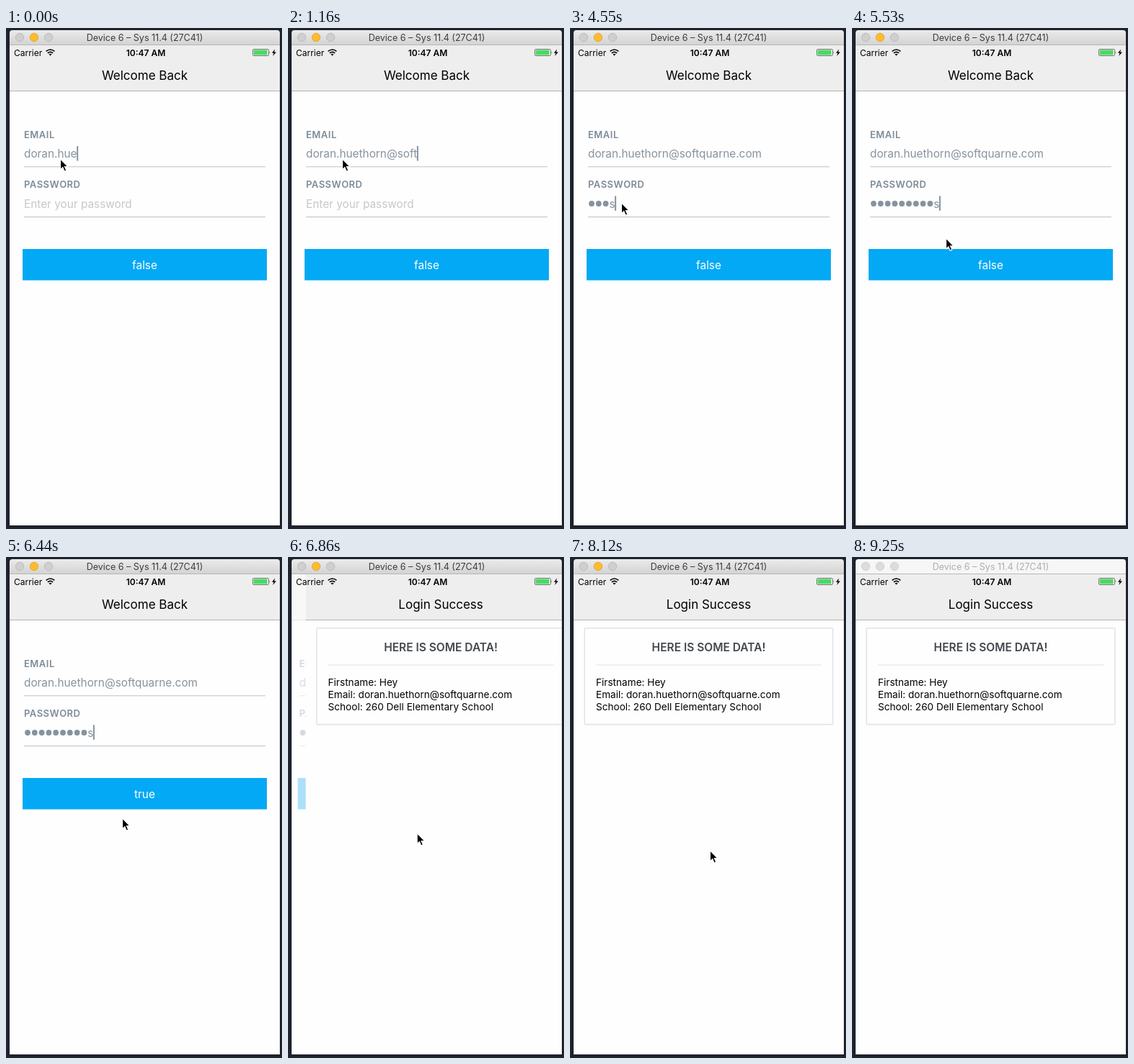
An HTML page for the animation above (9.35 s loop, 383 by 696 pixels).

```html
<!DOCTYPE html>
<html lang="en">
<head>
<meta charset="utf-8">
<title>Login flow</title>
<style>
html, body { margin: 0; width: 100%; height: 100%; overflow: hidden; background: #1f232d; }
svg { display: block; }
text { font: 15.35px Inter, sans-serif; }
.mid { text-anchor: middle; }
.bar { font-size: 12.5px; }
.status { font-size: 12px; }
.nav { font-size: 17px; }
.label { font-size: 13px; font-weight: 600; letter-spacing: .5px; fill: #7d8b97; }
.field { fill: #86939e; }
.head { font-size: 15.5px; font-weight: 600; fill: #43484d; }
.data { font-size: 13.6px; }
</style>
</head>
<body>
<svg width="383" height="696" viewBox="0 0 383 696">
  <defs>
    <linearGradient id="metal" x2="0" y2="1">
      <stop stop-color="#ebebeb"/><stop offset="1" stop-color="#d2d2d2"/>
    </linearGradient>
  </defs>
  <rect width="383" height="696" fill="#1f232d"/>

  <path id="titlebar" d="M5 24V7q0-4 4-4h367q4 0 4 4v17z"/>
  <path d="M5 23.5h375" stroke="#b8b8b8"/>
  <g id="lights" stroke-width=".8">
    <circle cx="19" cy="13" r="5.7"/><circle cx="39" cy="13" r="5.7"/><circle cx="59" cy="13" r="5.7"/>
  </g>
  <text id="device" class="bar mid" x="192.5" y="17.5">Device 6 – Sys 11.4 (27C41)</text>

  <svg x="5" y="24" width="375" height="667" viewBox="5 24 375 667">
    <rect x="5" y="24" width="375" height="667" fill="#fefefe"/>
    <g id="login">
      <rect x="5" y="24" width="375" height="63" fill="#eeeeef"/>
      <path d="M5 87.5h375" stroke="#b4b4b5"/>
      <text class="nav mid" x="192.5" y="71.5">Welcome Back</text>
      <text class="label" x="25" y="152.5">EMAIL</text>
      <text id="mail" class="field" x="25" y="180"></text>
      <text class="label" x="25" y="222">PASSWORD</text>
      <text id="hint" x="25" y="249.5" fill="#c7c7cd">Enter your password</text>
      <path id="dots" stroke="#86939e" stroke-width="7.8" stroke-linecap="round" stroke-dasharray="0 9.8"/>
      <text id="letter" class="field" y="249.5"></text>
      <path d="M25 192.8h335M25 262.5h335" stroke="#b9c2ca"/>
      <rect id="caret" width="2" height="20.5" fill="#86939e"/>
      <rect x="23" y="307" width="339" height="43.5" fill="#03a9f4"/>
      <text id="button" class="mid" x="192.5" y="334.5" fill="#fff"></text>
    </g>
    <g id="success">
      <rect x="5" y="24" width="375" height="667" fill="#fefefe"/>
      <rect x="5" y="24" width="375" height="63" fill="#eeeeef"/>
      <path d="M5 87.5h375" stroke="#b4b4b5"/>
      <text class="nav mid" x="192.5" y="71.5">Login Success</text>
      <rect x="20.2" y="98.8" width="344.6" height="133.8" rx="1" fill="none" stroke="#e2e4eb" stroke-width="1.6"/>
      <text class="head mid" x="192.5" y="130.5">HERE IS SOME DATA!</text>
      <path d="M36 150h313" stroke="#e8eaef" stroke-width="1.4"/>
      <text class="data" x="36" y="179">Firstname: Hey</text>
      <text class="data" x="36" y="196">Email: <tspan id="address"></tspan></text>
      <text class="data" x="36" y="213">School: 260 Dell Elementary School</text>
    </g>
  </svg>

  <text class="status" x="11" y="38.5">Carrier</text>
  <g fill="none" stroke="#000" stroke-width="1.6">
    <path d="M55.6 32.4q5.9-4.8 11.8 0M57.8 34.8q3.7-2.8 7.4 0"/>
  </g>
  <path d="M59.4 36.4q2.1-1.5 4.2 0L61.5 38.6z"/>
  <text class="status mid" x="194" y="38.5" font-weight="600" style="font-weight:600">10:47 AM</text>
  <rect x="342.5" y="29.5" width="22" height="9" rx="1.5" fill="#fff" stroke="#555" stroke-width=".8"/>
  <rect x="343.6" y="30.6" width="19" height="6.8" rx=".6" fill="#4cd964"/>
  <path d="M365.6 32.3q1.6 1.7 0 3.4z" fill="#444"/>
  <path d="M373.2 29.5l-4.2 5.2h2.6l-1.4 4.3 4.8-5.6h-2.8z"/>

  <path id="cursor" d="M0 0V14.6L3.3 11.5 5.6 17 8.2 15.9 5.9 10.6H10.4Z" stroke="#fff" stroke-width="1.1"/>
</svg>
<script>
const LOOP = 9350;
const EMAIL = 'doran.huethorn@softquarne.com', SECRET = 'possessors';
const mailKeys = [60, 170, 270, 380, 380, 620, 860, 1010, 1080, 1160, 1250, 1350,
  1460, 1560, 1660, 2040, 2190, 2370, 2450, 2520];
const secretKeys = [4090, 4250, 4400, 4550, 4640, 4730, 4820, 4920, 5010, 5100];
// Pointer path: time, x, y
const path = [
  [0, 75.5, 182], [2910, 75.5, 182], [3100, 74, 214], [3290, 71.5, 243],
  [5370, 71.5, 243], [5450, 100, 266], [5530, 130.5, 292], [5650, 140, 315], [5790, 143, 325],
  [6060, 143, 325], [6220, 150, 341], [6440, 161.5, 363], [6700, 175, 380], [6950, 181.5, 386],
  [8070, 181.5, 386], [8300, 240, 485], [8610, 356, 700], [LOOP, 356, 700]
];
const $ = id => document.getElementById(id);
const set = (id, attrs) => {
  for (const k in attrs) $(id).setAttribute(k, attrs[k]);
};
const say = (id, s) => {
  if ($(id).textContent !== s) $(id).textContent = s;
};
const pressed = (keys, t) => keys.filter(k => k <= t).length;
const width = id => $(id).textContent ? $(id).getComputedTextLength() : 0;

function pointer(t) {
  const i = path.findIndex(p => p[0] > t);
  const [t0, x0, y0] = path[i - 1], [t1, x1, y1] = path[i];
  const k = (t - t0) / (t1 - t0);
  return [x0 + (x1 - x0) * k, y0 + (y1 - y0) * k];
}

function drawForm(t) {
  const count = pressed(secretKeys, t), hidden = Math.max(0, count - 1);
  say('mail', EMAIL.slice(0, 9 + pressed(mailKeys, t)));
  say('hint', count ? '' : 'Enter your password');
  say('letter', count ? SECRET[count - 1] : '');
  say('button', t < 6060 ? 'false' : 'true');
  set('letter', { x: 25 + hidden * 9.8 });
  set('dots', { d: hidden ? `M30 244h${(hidden - 1) * 9.8 + .1}` : '' });

  const inMail = t < 3700;
  const off = (t >= 3030 && t < 3700) || (t >= 5600 && t < 6060) || t >= 6600;
  set('caret', {
    x: 24.6 + (inMail ? width('mail') : hidden * 9.8 + width('letter')),
    y: inMail ? 164 : 233.3,
    opacity: off ? 0 : 1
  });
}

function drawPush(t) {
  // Critically damped spring
  const s = Math.max(0, t - 6500) * .013, left = (1 + s) * Math.exp(-s);
  set('login', { transform: `translate(${-10 * (1 - left)} 0)`, opacity: .3 + .7 * left });
  set('success', { transform: `translate(${375 * left} 0)` });
}

function drawTitlebar(active) {
  set('titlebar', { fill: active ? 'url(#metal)' : '#f6f6f6' });
  set('device', { fill: active ? '#3c3c3c' : '#aeaeae' });
  [...$('lights').children].forEach((c, i) => {
    const lit = active && i === 1;
    c.setAttribute('fill', lit ? '#fdbc2f' : active ? '#cfcfcf' : '#dcdcdc');
    c.setAttribute('stroke', lit ? '#dfa023' : active ? '#b5b5b5' : '#cbcbcb');
  });
}

function draw(t) {
  drawForm(t);
  drawPush(t);
  drawTitlebar(t < 9250);
  set('cursor', { transform: `translate(${pointer(t)})` });
}

say('address', EMAIL);
const start = performance.now();
(function tick() {
  draw((performance.now() - start) % LOOP);
  requestAnimationFrame(tick);
})();
</script>
</body>
</html>
```
